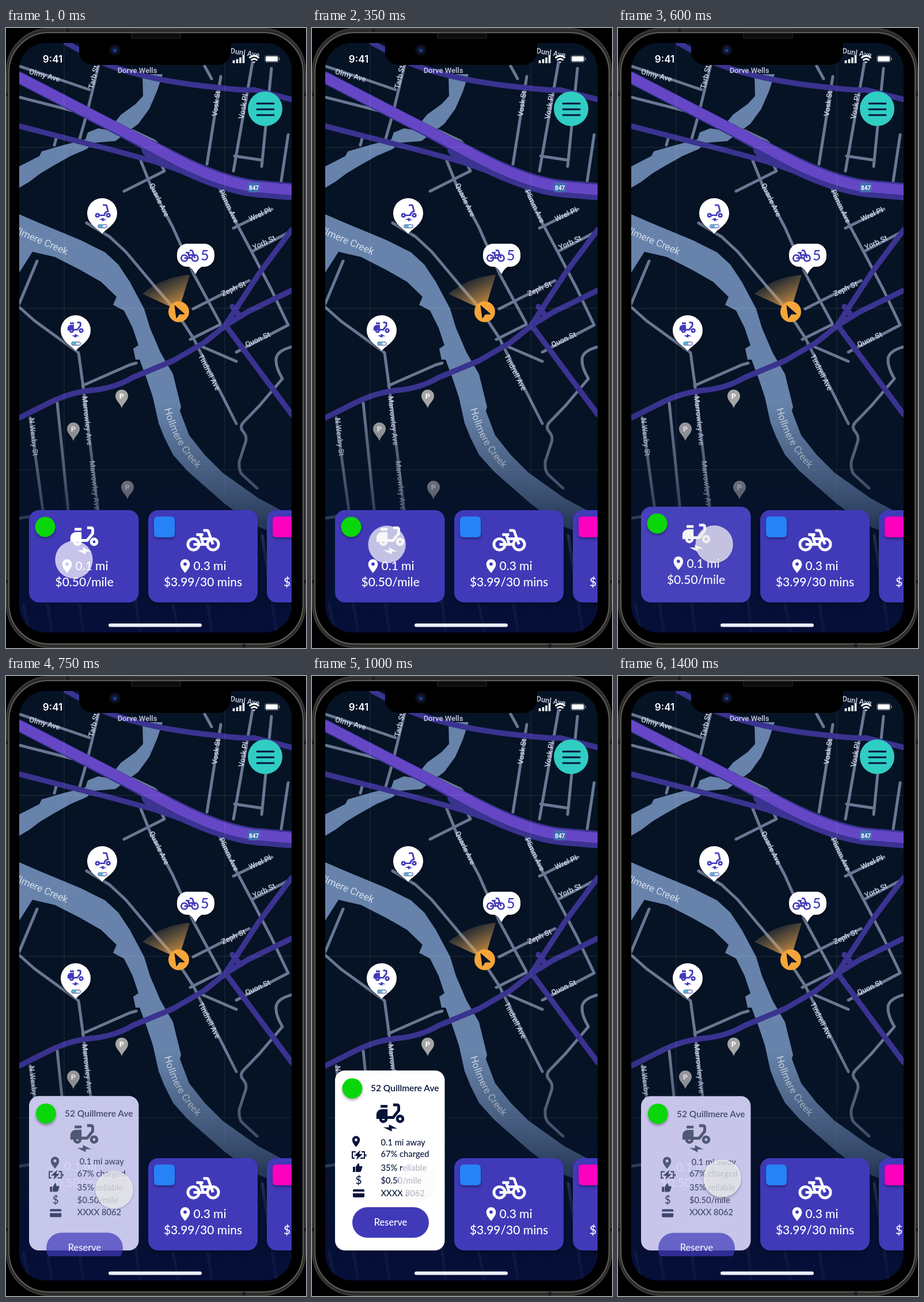
An HTML page for the animation above (1.45 s loop, 521 by 1075 pixels).

```html
<!DOCTYPE html>
<html lang="en">
<head>
<meta charset="utf-8">
<title>Ride reservation</title>
<style>
@property --p { syntax: "<number>"; inherits: true; initial-value: 0; }
html, body { margin: 0; height: 100%; overflow: hidden; background: #000; }
svg { display: block; width: 100vw; height: 100vh; }
text { font-family: Lato, sans-serif; font-weight: 500; }
.label text { font: 500 13px Roboto, sans-serif; fill: #ccd3e2; text-anchor: middle; dominant-baseline: central; }
.label .water { font-size: 17px; font-weight: 400; fill: #d5deeb; }
.park text { font: 700 13px Roboto, sans-serif; fill: #fff; text-anchor: middle; }
.road { fill: none; stroke-linejoin: round; stroke-linecap: round; }
.line { fill: none; stroke: currentColor; stroke-width: 2; }
.big { font-size: 21px; fill: #fff; }
.lift { filter: drop-shadow(0 3px 2px #0005); }

/* --p is 0 for the compact card and 1 for the open one */
.card { animation: open 1.45s infinite; }
.panel {
  y: calc(836px - 152px * var(--p));
  height: calc(160px + 152px * var(--p));
  fill: color-mix(in srgb, #fff calc(var(--p) * 100%), #403ab9);
}
.ink { color: color-mix(in srgb, #07143a calc(var(--p) * 100%), #fff); }
.out, .in { transform: translate(calc(var(--x, 0) * var(--q) * 1px), calc(var(--y, 0) * var(--q) * 1px)); }
.out { --q: var(--p); }
.in { --q: (1 - var(--p)); opacity: var(--p); }
.in text { font-size: 14.7px; fill: #07143a; }
.fade { opacity: calc(1 - var(--p)); }
.shrink { transform: scale(calc(1 - .2 * var(--p))); }
@keyframes open {
  0% { --p: 0; }
  40.97% { --p: 0; animation-timing-function: ease-out; }
  61.66% { --p: 1; }
  92.69% { --p: 1; animation-timing-function: cubic-bezier(0, 0, .425, .504); }
  100% { --p: .488; }
}

.touch { animation: touch 1.45s linear infinite; }
@keyframes touch {
  0% { transform: translate(118px, 922px); }
  13.79% { transform: translate(107px, 893px); }
  34.48% { transform: translate(153px, 898px); }
  51.72% { transform: translate(188px, 891px); }
  58.62% { transform: translate(185px, 881px); filter: drop-shadow(0 2px 2px #0006); animation-timing-function: ease-out; }
  75%, 88% { transform: translate(181.5px, 872px); filter: drop-shadow(0 2px 2px #0000); }
  94%, 100% { transform: translate(181px, 871px); filter: drop-shadow(0 2px 2px #0006); }
}
</style>
</head>
<body>
<svg viewBox="0 0 521 1075" preserveAspectRatio="none">
<defs>
  <clipPath id="screen"><rect x="23" y="26" width="473" height="1022" rx="46"/></clipPath>
  <clipPath id="cardBox"><rect x="30" y="600" width="215" height="406"/></clipPath>
  <linearGradient id="dusk" x1="0" y1="650" x2="0" y2="1048" gradientUnits="userSpaceOnUse">
    <stop offset="0" stop-color="#061328" stop-opacity="0"/>
    <stop offset=".36" stop-color="#06122b" stop-opacity=".4"/>
    <stop offset=".65" stop-color="#061032" stop-opacity=".82"/>
    <stop offset="1" stop-color="#050e3a" stop-opacity=".94"/>
  </linearGradient>
  <linearGradient id="beam" x1="300" y1="490" x2="276" y2="438" gradientUnits="userSpaceOnUse">
    <stop offset="0" stop-color="#f5a53a" stop-opacity=".9"/>
    <stop offset="1" stop-color="#d9a866" stop-opacity=".17"/>
  </linearGradient>

  <!-- icons on a 24 unit grid -->
  <path id="bolt" d="M7 20H11V18L17 21H13V23Z" fill="currentColor"/>
  <g id="moped">
    <path d="M14 3H17A2 2 0 0 1 19 5V8.350L14.500 14H10A3 3 0 0 1 4 14H2V11A4 4 0 0 1 6 7H10V12H13.500L17 7.650V5H14ZM6 14A1 1 0 0 0 8 14ZM5 4H10V6H5Z" fill="currentColor" fill-rule="evenodd"/>
    <circle cx="19" cy="14" r="2" class="line"/>
    <use href="#bolt"/>
  </g>
  <g id="bike" class="line">
    <circle cx="5" cy="15" r="4"/><circle cx="19" cy="15" r="4"/>
    <path d="M7 8H12M9.800 8L12 15M5 15H15M10.600 11H18M12 5H14.600Q15.300 5 15.600 5.700L18.950 15"/>
  </g>
  <g id="kick" class="line">
    <circle cx="5" cy="15" r="2"/><circle cx="19" cy="15" r="2"/>
    <path d="M7 15H14Q14 11 18.600 10L16.900 2.800Q16.700 2 15.900 2H12"/>
    <use href="#bolt" transform="matrix(-1 0 0 1 24 0)" stroke="none"/>
  </g>
  <path id="place" d="M0 12C-4 7-8.400 2-8.400-3.500A8.400 8.400 0 0 1 8.400-3.500C8.400 2 4 7 0 12ZM0-6.500a3 3 0 1 0 .01 0Z" fill="currentColor" fill-rule="evenodd"/>
  <g id="charge">
    <rect x="-7" y="20.500" width="15" height="5.500" rx="1.500" fill="#fff" stroke="#26308a"/>
    <rect x="-6" y="21.500" width="7" height="3.500" fill="#35b8e0"/>
  </g>
  <path id="drop" d="M0 36C-5 28-26 20-26 0A26 26 0 0 1 26 0C26 20 5 28 0 36Z" fill="#fff"/>
  <g id="parking" class="park">
    <path d="M0 21C-3 12-11 8-11 0A11 11 0 0 1 11 0C11 8 3 12 0 21Z" fill="#a5a5a5"/>
    <text y="4.500">P</text>
  </g>
</defs>

<!-- phone body -->
<rect width="521" height="1075"/>
<rect x="1" y="1" width="519" height="1073" rx="74" fill="#2b2b29" stroke="#3a3a37" stroke-width="2"/>
<rect x="5" y="8" width="511" height="1060" rx="69" fill="#000" stroke="#5f5e5a" stroke-width="2"/>
<path d="M0 115h4M517 115h4M0 960h4M517 960h4M107 1v6M413 1068v6" stroke="#1c1c1b" stroke-width="5"/>
<rect x="217" y="9" width="87" height="9" rx="4" fill="#0c0c0c" stroke="#2a2a2a"/>

<g clip-path="url(#screen)">
  <rect x="23" y="26" width="473" height="1022" fill="#061325"/>

  <!-- water -->
  <g fill="#6783ab">
    <path d="M237 80H272L262 110 249 140 230 166 190 196 152 199 140 210 112 222 80 240 60 252 40 267 23 277V240L58 222 62 214 100 203 138 193 142 181 160 174 178 177 200 150 225 132 238 118Z"/>
    <path d="M23 323L60 339 130 368 172 389 195 410 215 440 240 487 250 520 268 562 290 600 304 657 302 664 318 706 345 740 376 771 438 815 496 846V886L430 862 380 825 340 790 315 768 290 740 275 710 265 685 255 640 245 610 232 575H225L221 556 230 550 220 520 205 490 186 480 192 466 165 440 130 420 85 397 46 388 23 424Z"/>
  </g>

  <!-- streets -->
  <g class="road" stroke="#6a7793" stroke-width="5">
    <path d="M23 66L95 90 145 107M23 120L130 147M162 60L140 150 128 192M88 188L84 203"/>
    <path d="M330 28L382 52M345 66L357 88M373 84L349 236M428 60L395 248M461 70L444 240M490 185L478 265M397 222L444 229"/>
    <path d="M205 283L275 248 262 220M220 178L258 196 274 212M245 222L256 204"/>
    <path d="M234 230L250 270 290 346 325 425 372 512"/>
    <path d="M140 338L180 362 208 388 260 450 290 484 325 537 400 686"/>
    <path d="M366 265L385 310 425 385 460 452 490 515M395 347L462 314M430 386L490 355M325 487L422 438M330 548L400 578M400 562L490 515M320 540L372 514"/>
    <path d="M496 553Q470 560 469 574T480 608L440 655 412 684Q405 692 412 700T416 718L405 752Q404 770 412 776L436 798"/>
    <path d="M23 484L50 508 126 563 134 622 160 836M54 404L23 478M133 620L215 584 226 581M89 650L108 836M42 676L64 836"/>
    <path d="M23 850L42 847M30 1000L40 1048M72 1000L80 1048M128 1000L134 1048M224 980L232 1048M290 1000L300 1048M350 1000L358 1048M445 880L470 1048"/>
  </g>
  <g class="road" stroke="#3a3390" stroke-width="9.500">
    <path d="M105 26L172 62Q240 88 330 99T430 107L496 124"/>
    <path d="M23 170L190 213 260 232 300 246"/>
    <path d="M23 676L75 650Q110 632 150 628T220 606L290 577 345 545 381 516 420 492 496 455M496 350L440 425 381 515 496 670M393 483L406 499"/>
    <path d="M23 86L200 178 255 208" stroke-width="21"/>
    <path d="M250 209L290 229Q370 270 430 278L500 284" stroke-width="30"/>
    <path d="M23 86L200 177 290 225Q370 267 430 275L500 281" stroke="#6547c6" stroke-width="18"/>
  </g>
  <path d="M101 26V1048M380 26V1048M23 207H496M23 486H496M23 766H496" stroke="#fff" stroke-opacity=".12"/>

  <g class="label">
    <text transform="translate(228 73)">Dorve Wells</text>
    <text transform="translate(67 82) rotate(15)">Olmy Ave</text>
    <text transform="translate(152 85) rotate(-77)">Tarb St</text>
    <text transform="translate(415 43) rotate(9)">Dunl Ave</text>
    <text transform="translate(365 131) rotate(-82)">Vosk St</text>
    <text transform="translate(412 136) rotate(-80)">Vosk Pl</text>
    <text transform="translate(266 298) rotate(64)">Quarle Ave</text>
    <text transform="translate(387 309) rotate(64)">Plimm Ave</text>
    <text transform="translate(441 323) rotate(-25)">Wrel Pl</text>
    <text transform="translate(448 372) rotate(-25)">Yorb St</text>
    <text transform="translate(395 452) rotate(-25)">Zeph St</text>
    <text transform="translate(437 540) rotate(-25)">Quon St</text>
    <text transform="translate(353 597) rotate(63)">Tindrell Ave</text>
    <text transform="translate(141 681) rotate(84)">Marrowley Ave</text>
    <text transform="translate(154 793) rotate(84)">Marrowley Ave</text>
    <text transform="translate(48 709) rotate(84)">N Wexby St</text>
    <text class="water" transform="translate(107 388) rotate(23)" style="text-anchor:end">Hollmere Creek</text>
    <path id="bend" d="M281 659Q296 722 344 768" fill="none"/>
    <text class="water" style="text-anchor:start"><textPath href="#bend">Hollmere Creek</textPath></text>
    <rect x="420" y="268" width="21" height="17" rx="4" fill="#426fb4"/>
    <text transform="translate(430.500 277)" style="font-size:10px;font-weight:700;fill:#fff">847</text>
  </g>
  <use href="#parking" x="201" y="638"/>
  <use href="#parking" x="117" y="695"/>
  <use href="#parking" x="211" y="796"/>
  <rect x="23" y="640" width="473" height="408" fill="url(#dusk)"/>

  <!-- vehicles and position -->
  <g color="#403ab9">
    <g transform="translate(167 321)">
      <use href="#drop" class="lift"/><use href="#kick" transform="translate(-15 -16.500) scale(1.350)"/><use href="#charge" y="-.5"/>
    </g>
    <g transform="translate(121 524)">
      <use href="#drop" class="lift"/><use href="#moped" transform="translate(-17 -19) scale(1.400)"/><use href="#charge"/>
    </g>
    <path class="lift" d="M315 374H344A18 18 0 0 1 362 392V396A18 18 0 0 1 344 414H340Q334 417 329 427 324 417 318 414H315A18 18 0 0 1 297 396V392A18 18 0 0 1 315 374Z" fill="#fff"/>
    <use href="#bike" transform="translate(303 379) scale(1.330)"/>
    <text x="338" y="403" font-size="25" fill="#403ab9">5</text>
  </g>
  <path d="M300 490L237 461Q270 432 319 428Z" fill="url(#beam)"/>
  <circle cx="300" cy="492" r="18" fill="#f5a53a"/>
  <path d="M293 481L310 496 301 496 296 503Z" fill="#081228" stroke="#081228" stroke-linejoin="round"/>

  <circle cx="450" cy="140" r="30" fill="#30cdc3"/>
  <path d="M436 131H465M436 141H465M436 151H465" stroke="#07143a" stroke-width="3" stroke-linecap="round"/>

  <!-- status bar -->
  <path d="M127 20V42A23 23 0 0 0 150 64H368A23 23 0 0 0 391 42V20Z"/>
  <circle cx="189" cy="38" r="10" fill="#0b0e16"/>
  <circle cx="189" cy="38" r="6" fill="#101b42"/>
  <circle cx="189" cy="39" r="2.500" fill="#24458f"/>
  <text x="81" y="60" text-anchor="middle" fill="#fff" style="font:600 17px Inter,sans-serif">9:41</text>
  <path d="M395.500 61V56M401.500 61V54M407 61V51M412.500 61V47" stroke="#fff" stroke-width="3.600"/>
  <g fill="none" stroke="#fff" stroke-width="2.700">
    <path d="M422.500 52Q431 44.500 439.500 52M425.500 56Q431 51 436.500 56"/>
    <path d="M428.500 58.500H433.500L431 61Z" fill="#fff" stroke="none"/>
  </g>
  <rect x="449.500" y="47.500" width="24" height="12" rx="3.500" fill="none" stroke="#fff" stroke-opacity=".4"/>
  <rect x="451" y="49" width="21" height="9" rx="2" fill="#fff"/>
  <path d="M475 51.500V55.500" stroke="#fff" stroke-opacity=".5" stroke-width="1.500"/>

  <!-- neighbouring cards -->
  <g class="lift" fill="#403ab9">
    <rect x="247" y="836" width="190" height="160" rx="17"/>
    <rect x="453" y="836" width="190" height="160" rx="17"/>
  </g>
  <rect class="lift" x="257" y="847" width="36" height="36" rx="6" fill="#2583f7"/>
  <rect class="lift" x="463" y="847" width="36" height="36" rx="6" fill="#ff00bf"/>
  <g color="#fff">
    <use href="#bike" transform="translate(313.500 859) scale(2.420)"/>
    <use href="#place" x="311" y="933"/>
  </g>
  <text class="big" x="325.500" y="940">0.3 mi</text>
  <text class="big" x="342" y="968" text-anchor="middle">$3.99/30 mins</text>
  <text class="big" x="482" y="968">$1.50/mile</text>

  <!-- opening card -->
  <g class="card" clip-path="url(#cardBox)">
    <rect class="panel" x="40" width="190.500" rx="17"/>
    <g class="out fade" style="--x:-28;--y:-115"><text class="big" x="120.500" y="940">0.1 mi</text></g>
    <g class="out fade" style="--x:-16;--y:-116"><text class="big" x="85.500" y="968">$0.50/mile</text></g>
    <g class="out" style="--x:2;--y:-150"><circle class="lift" cx="68" cy="865" r="17.500" fill="#0ad70a"/></g>
    <g class="out ink" style="--y:-123">
      <use href="#moped" transform="translate(107 857) scale(2.420)"/>
    </g>
    <g class="out ink" style="--x:-29.500;--y:-126">
      <g transform="translate(106 933)"><use href="#place" class="shrink"/></g>
    </g>

    <g class="in" style="--y:152">
      <text x="102" y="720" style="font-size:15.500px;font-weight:600">52 Quillmere Ave</text>
      <rect x="70" y="921" width="133" height="53" rx="26.500" fill="#403ab9"/>
      <text x="136.500" y="952.500" text-anchor="middle" style="font-size:16.500px;fill:#fff">Reserve</text>
    </g>
    <g class="in" style="--x:28;--y:115"><text x="119.500" y="814">0.1 mi away</text></g>
    <g class="in" style="--x:15;--y:116">
      <text x="119.500" y="834">67% charged</text>
      <text x="119.500" y="858">35% reliable</text>
      <text x="119.500" y="880">$0.50/mile</text>
      <text x="119.500" y="901.500">XXXX 8062</text>
    </g>
    <g class="in" style="--x:18;--y:118" color="#07143a">
      <path class="line" d="M76 825H70V836H74M86 825H91V836H84M93.500 829V833"/>
      <path d="M84 822L73 832H79L77 839 88 829H82Z" fill="currentColor"/>
      <path d="M71 851H75V860H71ZM76 851L80 845Q83 845 82 850H87Q88 851 87 853L85 859 83 860H76Z" fill="currentColor"/>
      <text x="81" y="880.500" text-anchor="middle" style="font-size:19px">$</text>
      <path d="M73 890H89Q91 890 91 892V894H71V892Q71 890 73 890ZM71 897H91V902Q91 904 89 904H73Q71 904 71 902Z" fill="currentColor"/>
    </g>
  </g>

  <g class="touch">
    <circle r="32" fill="#fff" fill-opacity=".7" stroke="#fff" stroke-opacity=".5" stroke-width="1.500"/>
  </g>
  <rect x="178" y="1032.500" width="162" height="6" rx="3" fill="#eef0f8"/>
</g>
</svg>
</body>
</html>
```
